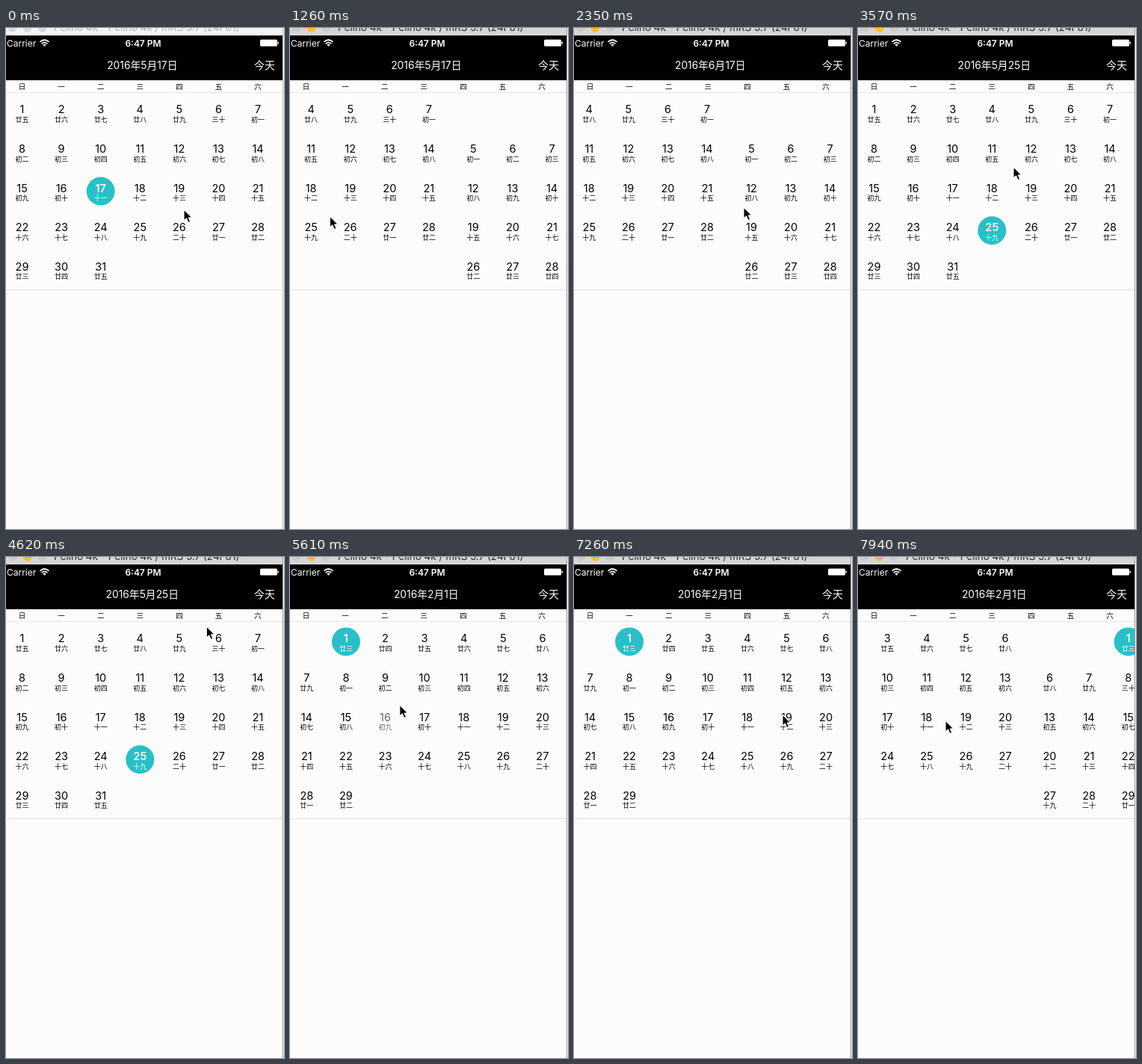
Recreate the animation shown at these times as an HTML page. Size 372 px wide and 671 px high, loop 7.99 s.

```html
<!DOCTYPE html>
<html lang="zh">
<head>
<meta charset="utf-8">
<title>Calendar</title>
<style>
html, body { margin: 0; width: 100%; height: 100%; overflow: hidden; background: #fcfcfc; }
svg { display: block; width: 372px; height: 671px; }
text { font-family: Inter, "Noto Sans CJK SC", "Noto Sans CJK", sans-serif; }
.mid { text-anchor: middle; }
.num { font-size: 14.5px; }
.lunar { font-size: 9px; }
.cell circle { fill: #28c0c6; visibility: hidden; }
.on circle { visibility: visible; }
.on text { fill: #fff; }
.on .num { font-weight: 600; }
.pressed { opacity: .6; }
#bar { fill: #f4f4f4; }
#caption { fill: #b0b0b0; }
#lights { fill: #dadada; }
#edge { fill: #b8b8b8; }
.active #bar { fill: #d6d6d6; }
.active #caption { fill: #262626; }
.active #lights { fill: #cbcbcb; }
.active #yellow { fill: #fdbc2e; }
.active #edge { fill: #989898; }
</style>
</head>
<body>
<svg id="stage" viewBox="0 0 372 671">
  <defs>
    <clipPath id="strip"><rect width="372" height="10"/></clipPath>
    <clipPath id="view"><rect id="viewBox" y="87" width="370" height="263"/></clipPath>
  </defs>
  <rect width="372" height="671" fill="#fcfcfc"/>
  <g clip-path="url(#strip)">
    <rect id="bar" width="371" height="10"/>
    <g id="lights">
      <circle cx="8.5" cy="-.5" r="6"/><circle id="yellow" cx="28.5" cy="-.5" r="6"/><circle cx="48.5" cy="-.5" r="6"/>
    </g>
    <text id="caption" x="64" y="4" font-size="13.5">Pelino 4k - Pelino 4k / mRS 5.7 (24F81)</text>
  </g>
  <rect y="10" width="370" height="60"/>
  <g fill="#fff">
    <text x="1" y="24.5" font-size="12">Carrier</text>
    <path d="M45.5 18.6Q51.5 13.4 57.5 18.6M47.7 21Q51.5 17.7 55.3 21" fill="none" stroke="#fff" stroke-width="1.7"/>
    <path d="M49.2 22.3Q51.5 20.5 53.8 22.3L51.5 24.8Z"/>
    <text class="mid" x="183.5" y="24.5" font-size="12" font-weight="600">6:47 PM</text>
    <rect x="340" y="15.5" width="23" height="9" rx="1.5"/>
    <rect x="363.6" y="18.2" width="1.4" height="3.6" rx=".7"/>
    <text id="title" class="mid" x="182.3" y="55" font-size="13.8"></text>
    <text class="mid" x="346" y="55.2" font-size="14">今天</text>
  </g>
  <g id="week"></g>
  <rect y="86" width="370" height="1" fill="#e6e6e6"/>
  <g id="pages" clip-path="url(#view)"></g>
  <rect id="rule" width="370" height="1" fill="#dedede"/>
  <rect id="edge" x="370" width="1" height="671"/>
  <path id="cursor" d="M0 0V15.2L3.5 12L6 17.6L8.7 16.4L6.3 11H11Z" stroke="#fff" stroke-width="1.1" stroke-linejoin="round"/>
</svg>
<script>
const LOOP = 7990, PITCH = 375, COL = 52.6, LEFT = 21.5, YEAR = 2016;
const SPEED = .8, DRAG = 270, DELAY = 220, SETTLE = 350, GLIDE = 560;
const $ = id => document.getElementById(id);
const clamp = u => Math.min(1, Math.max(0, u));
const easeOut = u => 1 - (1 - u) ** 3;
const smooth = u => u * u * (3 - 2 * u);
const mix = (a, b, u) => a + (b - a) * u;

function add(parent, tag, attrs, text) {
  const el = document.createElementNS("http://www.w3.org/2000/svg", tag);
  for (const k in attrs) el.setAttribute(k, attrs[k]);
  if (text) el.textContent = text;
  return parent.appendChild(el);
}

// Lunar months follow the new moon of 10 January
function lunarName(month, day) {
  const n = (Date.UTC(YEAR, month - 1, day) - Date.UTC(YEAR, 0, 10)) / 864e5;
  const moon = Math.ceil((n + 1) / 29.53) - 1;
  const d = n - Math.floor(29.53 * moon);
  if (d === 19) return "二十";
  if (d === 29) return "三十";
  return "初十廿"[Math.floor(d / 10)] + "一二三四五六七八九十"[d % 10];
}

const firstCol = m => new Date(Date.UTC(YEAR, m - 1, 1)).getUTCDay();
const monthDays = m => new Date(Date.UTC(YEAR, m, 0)).getUTCDate();
const weeks = m => Math.ceil((firstCol(m) + monthDays(m)) / 7);

[..."日一二三四五六"].forEach((c, i) =>
  add($("week"), "text", { class: "mid", x: LEFT + COL * i, y: 82, "font-size": 9.5 }, c));

const pages = [];
for (let m = 1; m <= 6; m++) {
  const g = add($("pages"), "g", {}), cells = [];
  for (let d = 1; d <= monthDays(m); d++) {
    const i = firstCol(m) + d - 1;
    const x = LEFT + COL * (i % 7), y = 113.4 + COL * Math.floor(i / 7);
    const cell = add(g, "g", { class: "cell", transform: `translate(${x} ${y})` });
    add(cell, "circle", { r: 19 });
    add(cell, "text", { class: "mid num", y: .9 }, String(d));
    add(cell, "text", { class: "mid lunar", y: 12.5 }, lunarName(m, d));
    cells[d] = cell;
  }
  pages.push({ m, g, cells });
}

// What the hand does: rest at a point, tap, or drag the month sideways
const rest = (at, x, y) => ({ at, x, y });
const tap = (at, x, y, change) => ({ at, x, y, hold: DELAY, ...change });
const swipe = (at, x, y, to, press) => ({ at, x, y, to, press, hold: DRAG, drag: true });

const steps = [
  tap(0, 238, 243, { to: 5, day: 17 }),
  swipe(1072, 204.5, 252, 6),
  swipe(2081, 11, 240, 5),
  tap(3250, 182, 268, { day: 25 }),
  rest(3570, 208, 186),
  rest(4030, 171, 157),
  tap(4870, 338, 47, { to: 2, day: 1 }),
  swipe(5610, 146, 198, 1, 16),
  swipe(6480, 285, 210, 2),
  rest(7260, 279, 211),
  swipe(7766, 257, 219, 3)
];

steps.forEach((s, i) => {
  const prev = steps[i - 1] || s;
  s.from = prev.to;
  s.to ??= prev.to;
  s.day ??= prev.day;
  s.hold ??= 0;
  s.pull = s.drag ? Math.sign(s.from - s.to) * SPEED : 0;
});

function monthAt(s, t) {
  const age = t - s.at;
  const held = s.from - s.pull * Math.min(age, s.hold) / PITCH;
  return mix(held, s.to, easeOut(clamp((age - s.hold) / SETTLE)));
}

function pointerAt(s, next, t) {
  const x = s.x + s.pull * Math.min(t - s.at, s.hold);
  if (!next) return [x, s.y];
  const span = Math.min(GLIDE, next.at - s.at - s.hold);
  const u = smooth(clamp(1 - (next.at - t) / span));
  return [mix(x, next.x, u), mix(s.y, next.y, u)];
}

function draw(t) {
  const i = steps.findLastIndex(s => s.at <= t);
  const s = steps[i], next = steps[i + 1];
  const pos = monthAt(s, t);
  const settled = !s.drag || t >= s.at + s.hold + SETTLE;
  const jumping = !s.drag && s.from !== s.to;
  const press = [s, next].find(p => p?.press && Math.abs(t - p.at) < 60);

  $("stage").classList.toggle("active", t >= steps[1].at);
  $("title").textContent = `${YEAR}年${settled ? s.to : s.from}月${s.day}日`;

  for (const { m, g, cells } of pages) {
    const x = (m - pos) * PITCH;
    g.setAttribute("transform", `translate(${x})`);
    g.setAttribute("visibility", Math.abs(x) < PITCH ? "visible" : "hidden");
    cells.forEach((cell, d) => {
      cell.classList.toggle("on", d === s.day && !(jumping && m === s.from));
      cell.classList.toggle("pressed", m === press?.from && d === press.press);
    });
  }

  const bottom = 350 + (weeks(Math.round(pos)) - 5) * COL;
  $("rule").setAttribute("y", Math.round(bottom));
  $("viewBox").setAttribute("height", bottom - 87);
  $("cursor").setAttribute("transform", `translate(${pointerAt(s, next, t)})`);
}

const start = performance.now();
function tick() {
  draw((performance.now() - start) % LOOP);
  requestAnimationFrame(tick);
}
tick();
</script>
</body>
</html>
```
